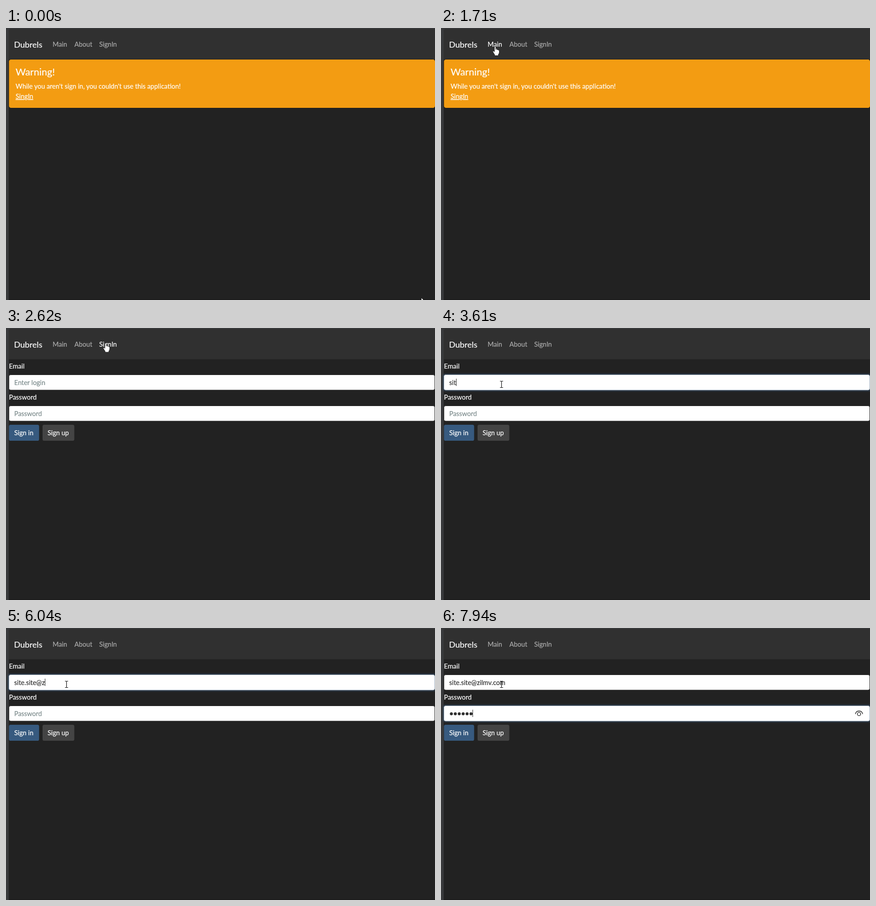
Animation, 939 px wide and 596 px high, one loop 8000 ms. Source, as an HTML page:

```html
<!DOCTYPE html>
<html lang="en">
<head>
<meta charset="utf-8">
<title>Sign in</title>
<style>
  html, body { margin: 0; width: 100%; height: 100%; overflow: hidden; background: #38393b; }
  svg { display: block; width: 939px; height: 596px; }
  text { font: 14.45px Lato, sans-serif; fill: #fff; stroke: #fff; stroke-width: .2; white-space: pre; }
  .brand { font-size: 18.2px; }
  .title { font-size: 21.6px; }
  .link { fill: #acacac; stroke: #acacac; }
  .link.hover { fill: #fff; stroke: #fff; }
  .hint { fill: #7b8a8b; stroke: #7b8a8b; }
  .value { fill: #303030; stroke: #303030; }
  .field { fill: #fff; stroke: #222; }
  .ring { fill: none; stroke: #375a7f; stroke-opacity: .25; stroke-width: 3.6; visibility: hidden; }
  .focus .ring { visibility: inherit; }
  .focus .field { stroke: #9badbf; }
  .caret { fill: #222; }
  .outlined { fill: #fff; stroke: #111; stroke-width: .8; }
</style>
</head>
<body>
<svg viewBox="0 0 939 596">
  <rect width="939" height="596" fill="#38393b"/>
  <path d="M6 596V8q0-6 6-6H939V596z" fill="#222"/>
  <path d="M6 68.5V8q0-6 6-6H939V68.500z" fill="#303030"/>
  <path d="M6 595H939" stroke="#1c1c1c" stroke-width="2"/>

  <text class="brand" x="17.5" y="43">Dubrels</text>
  <text class="link" x="102" y="41">Main</text>
  <text class="link" x="149.7" y="41">About</text>
  <text class="link" x="204" y="41">SignIn</text>

  <g id="warning">
    <rect x="6" y="68.5" width="933.5" height="107" rx="5" fill="#f39c12" stroke="#1b1b1b"/>
    <text class="title" x="21" y="104">Warning!</text>
    <text x="21" y="133">While you aren't sign in, you couldn't use this application!</text>
    <text x="21" y="155" text-decoration="underline">SingIn</text>
  </g>

  <g id="form">
    <text x="6.5" y="89">Email</text>
    <g id="email">
      <rect class="ring" x="4.7" y="100.7" width="936" height="37" rx="5.4"/>
      <rect class="field" x="6.5" y="102.5" width="932" height="33.5" rx="3.6"/>
      <text class="hint" x="18" y="124.5">Enter login</text>
      <text class="value" x="18" y="124.5"></text>
      <rect class="caret" y="111" width="1" height="16"/>
    </g>
    <text x="6.5" y="157">Password</text>
    <g id="secret">
      <rect class="ring" x="4.7" y="168.7" width="936" height="37" rx="5.4"/>
      <rect class="field" x="6.5" y="170.5" width="932" height="33.5" rx="3.6"/>
      <text class="hint" x="18" y="192.5">Password</text>
      <g id="dots" class="value" stroke="none"></g>
      <rect class="caret" y="179" width="1" height="16"/>
      <g id="eye" fill="none" stroke="#222" stroke-width="1.4">
        <path d="M907 188.5C909 179.5 921 179.5 923 188.5"/>
        <circle cx="915" cy="188.5" r="3.6"/>
      </g>
    </g>
    <rect x="6.5" y="212" width="66" height="35" rx="3.6" fill="#375a7f"/>
    <text x="18" y="235">Sign in</text>
    <rect x="80" y="212" width="69.5" height="35" rx="3.6" fill="#444"/>
    <text x="91" y="235">Sign up</text>
  </g>

  <circle id="click" cx="217" cy="31" r="11" fill="#f5ea0c" fill-opacity=".54"/>

  <g id="pointer">
    <path id="arrow" class="outlined" d="M0 0V16L3.7 12.6L6.2 18.3L8.6 17.3L6.2 11.6H11.5z"/>
    <path id="hand" class="outlined" d="M-1.5 1Q0-1 1.5 1V7Q3-.1 4.3 7.3Q6 5.8 6.8 8Q9 7 9 9.5V13Q8.7 16 7 17.5V20H-1V18Q-3 15-5.2 11.3Q-4.5 8.8-1.5 11.5z"/>
    <path id="beam" d="M-3.5-6.5H-1Q0-6.5 0-5.5Q0-6.5 1-6.5H3.5M0-5.5V6.5M-3.5 7.5H-1Q0 7.5 0 6.5Q0 7.5 1 7.5H3.5" fill="none" stroke="#111" stroke-width="1.2"/>
  </g>
</svg>
<script>
const LOOP = 8000, TICK = 100, BLINK = 510;
const FORM_AT = 2620, BEAM_AT = 3220, SECRET_AT = 7130;
const ADDRESS = 'site.site@zilmv.com';
const DOT_GAP = 8.6;

const $ = id => document.getElementById(id);
const links = [...document.querySelectorAll('.link')];
const value = document.querySelector('#email .value');

// The screen refreshes once per TICK, so moves and bursts advance in whole steps.
const home = { x: 909, y: 591 };
const glides = [
  { start: 100, steps: 4, x: 402, y: 229 },
  { start: 700, steps: 2, x: 386, y: 198 },
  { start: 1010, steps: 7, x: 125, y: 70 },
  { start: 1710, steps: 1, x: 118.5, y: 40.5 },
  { start: 1810, steps: 5, x: 218, y: 33 },
  { start: 3120, steps: 2, x: 132.5, y: 123 }
];
const typing = [
  { start: 3320, steps: 5 }, { start: 4030, steps: 2 }, { start: 4420, steps: 2 },
  { start: 5130, steps: 1 }, { start: 6040, steps: 5 }, { start: 6640, steps: 4 }
];
const masking = [7130, 7430, 7840].map(start => ({ start, steps: 2 }));

const stepsDone = ({ start, steps }, t) =>
  Math.max(0, Math.min(steps, Math.floor((t - start) / TICK) + 1));
const smooth = p => p * p * (3 - 2 * p);
const show = (el, on) => el.setAttribute('visibility', on ? 'inherit' : 'hidden');

function pointerAt(t) {
  return glides.reduce((from, glide) => {
    const p = smooth(stepsDone(glide, t) / glide.steps);
    return { x: from.x + (glide.x - from.x) * p, y: from.y + (glide.y - from.y) * p };
  }, home);
}

function keysAt(bursts, t) {
  let count = 0, last = 0;
  for (const burst of bursts) {
    const done = stepsDone(burst, t);
    count += done;
    if (done) last = burst.start + (done - 1) * TICK;
  }
  return { count, lit: Math.floor((t - last) / BLINK) % 2 === 0 };
}

for (let i = 0; i < 6; i++) {
  const dot = document.createElementNS('http://www.w3.org/2000/svg', 'circle');
  dot.setAttribute('cx', 22.7 + DOT_GAP * i);
  dot.setAttribute('cy', 188);
  dot.setAttribute('r', 2.9);
  $('dots').append(dot);
}

function drawPointer(t) {
  const { x, y } = pointerAt(t);
  const nav = y < 60;
  const beam = t >= BEAM_AT;
  $('pointer').setAttribute('transform', `translate(${x} ${y})`);
  show($('hand'), nav);
  show($('beam'), beam);
  show($('arrow'), !nav && !beam);
  for (const link of links) {
    const box = link.getBBox();
    link.classList.toggle('hover', nav && Math.abs(x - box.x - box.width / 2) < box.width / 2 + 7);
  }
}

function drawField(id, focused, keys, caretX) {
  const field = $(id);
  const caret = field.querySelector('.caret');
  field.classList.toggle('focus', focused);
  show(field.querySelector('.hint'), !keys.count);
  show(caret, focused && keys.lit);
  caret.setAttribute('x', Math.round(caretX));
}

function draw(t) {
  const form = t >= FORM_AT;
  show($('warning'), !form);
  $('form').style.display = form ? '' : 'none';
  show($('click'), !form && t >= FORM_AT - TICK);
  drawPointer(t);
  if (!form) return;

  const typed = keysAt(typing, t);
  value.textContent = ADDRESS.slice(0, typed.count);
  drawField('email', t >= BEAM_AT && t < SECRET_AT, typed, 18 + value.getComputedTextLength());

  const masked = keysAt(masking, t);
  [...$('dots').children].forEach((dot, i) => show(dot, i < masked.count));
  show($('eye'), masked.count);
  drawField('secret', t >= SECRET_AT, masked, 17.6 + DOT_GAP * masked.count);
}

const start = performance.now();
function tick() {
  draw((performance.now() - start) % LOOP);
  requestAnimationFrame(tick);
}
tick();
</script>
</body>
</html>
```
